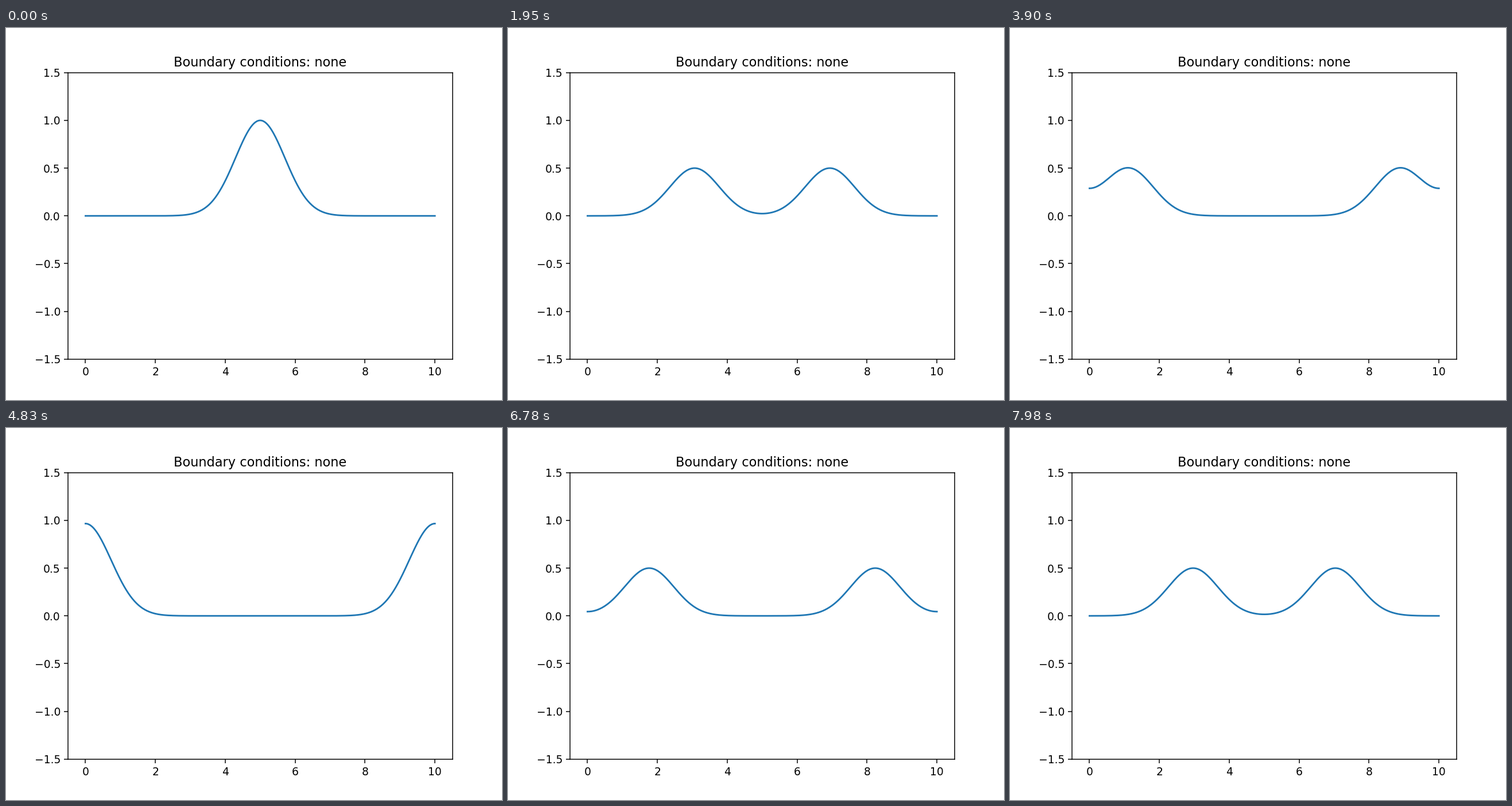
Animation, 864 px wide and 648 px high, one loop 8 s. Source, as a matplotlib script:

```python
import numpy as np
import matplotlib.pyplot as plt
from matplotlib.animation import FuncAnimation

LENGTH = 10
DT = 0.03          # wave time per step, wave speed 1
STEP_MS = 30       # screen time per step
TICK_MS = 20
LOOP_MS = 8000

x = np.linspace(0, LENGTH, 501)


def wave(step):
    """Split Gaussian pulse with free ends, built from mirror images."""
    shift = (step - 0.5) * DT
    u = np.zeros_like(x)
    for centre in (-LENGTH / 2, LENGTH / 2, 3 * LENGTH / 2):
        for move in (-shift, shift):
            u += 0.5 * np.exp(-(x - centre - move) ** 2)
    return u


plt.rcParams["font.family"] = "DejaVu Sans"
fig, ax = plt.subplots(figsize=(6.4, 4.8), dpi=135)
line, = ax.plot(x, wave(0), color="tab:blue", lw=1.5)
ax.set_xlim(-0.5, 10.5)
ax.set_ylim(-1.5, 1.5)
ax.set_title("Boundary conditions: none")


def update(tick):
    step = (tick * TICK_MS + TICK_MS // 2) // STEP_MS
    line.set_ydata(wave(step))
    return line,


anim = FuncAnimation(fig, update, frames=LOOP_MS // TICK_MS,
                     init_func=lambda: update(0), interval=TICK_MS,
                     repeat=True, repeat_delay=0)
plt.show()
```
